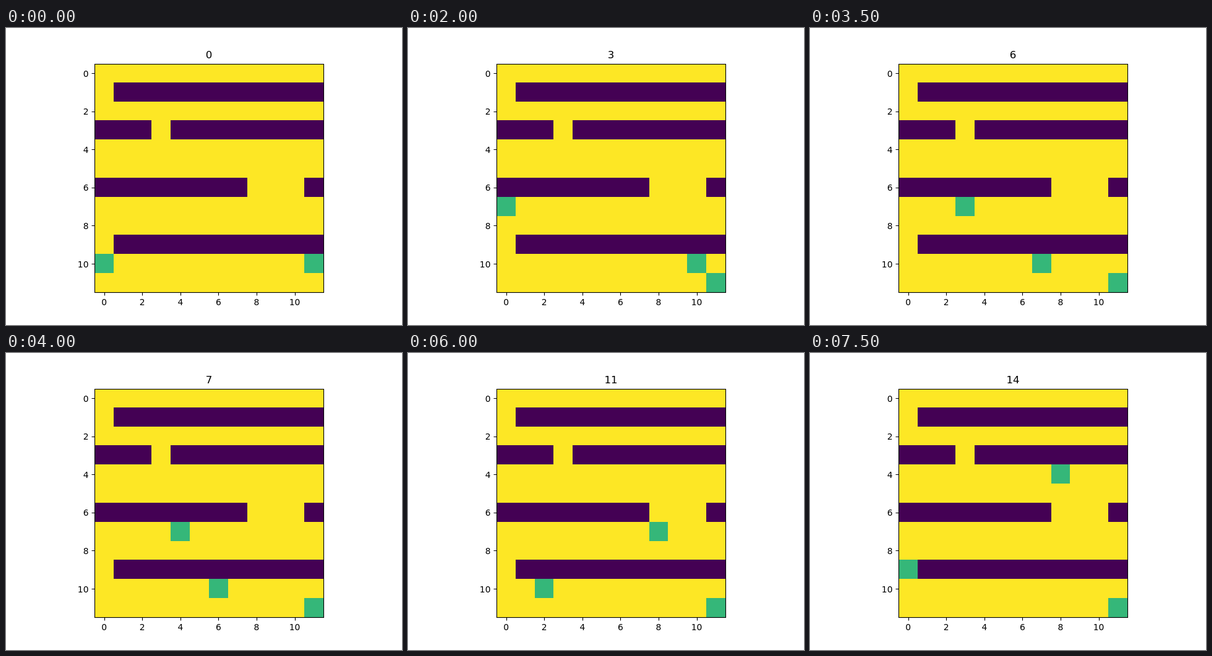
Write an HTML page that moves like this. It is 640 by 480 pixels and loops after 8 s.

```html
<!DOCTYPE html>
<html lang="en">
<head>
<meta charset="utf-8">
<title>Grid walk</title>
<style>
  html, body { margin: 0; width: 100%; height: 100%; overflow: hidden; background: #fff; }
  svg { display: block; }
  text { font: 13.889px "DejaVu Sans", sans-serif; fill: #000; }
  #count { font-size: 16.667px; }
  .axis { fill: none; stroke: #000; stroke-width: 1.11; }
  .wall { fill: #440154; }
  .walker { fill: #35b779; }
</style>
</head>
<body>
<svg id="stage" width="640" height="480" viewBox="0 0 640 480">
  <rect x="143" y="58" width="370" height="369" fill="#fde725"/>
  <g id="cells"></g>
  <g id="axes"></g>
  <text id="count" x="328" y="49" text-anchor="middle">0</text>
</svg>
<script>
const LOOP = 8000, STEP = 500, LAST = 14;
const SIZE = 370, COUNT = 12;
const cells = document.getElementById('cells');
const axes = document.getElementById('axes');
const counter = document.getElementById('count');

function add(parent, tag, attrs) {
  const node = document.createElementNS('http://www.w3.org/2000/svg', tag);
  for (const key in attrs) node.setAttribute(key, attrs[key]);
  parent.appendChild(node);
  return node;
}

// Cell borders snap to whole pixels, halves going down.
const edge = (start, i) => Math.ceil(start + SIZE * i / COUNT - 0.5);

function place(rect, col, row, span = 1) {
  const x = edge(143, col), y = edge(57, row);
  rect.setAttribute('x', x);
  rect.setAttribute('y', y);
  rect.setAttribute('width', edge(143, col + span) - x);
  rect.setAttribute('height', edge(57, row + 1) - y);
}

// Walls: column, row, length
const walls = [[1, 1, 11], [0, 3, 3], [4, 3, 8], [0, 6, 8], [11, 6, 1], [1, 9, 11]];
for (const wall of walls) place(add(cells, 'rect', { class: 'wall' }), ...wall);

// Walkers: waypoints as step, column, row; hidden before the first
const routes = [
  [[0, 0, 10], [3, 0, 7], [11, 8, 7], [14, 8, 4]],
  [[0, 11, 10], [1, 11, 11]],
  [[2, 11, 10], [13, 0, 10], [14, 0, 9]]
];
const walkers = routes.map(() => add(cells, 'rect', { class: 'walker' }));

function locate(route, step) {
  if (step < route[0][0]) return null;
  const next = route.findIndex(point => point[0] > step);
  if (next < 0) return route[route.length - 1].slice(1);
  const [s0, x0, y0] = route[next - 1], [s1, x1, y1] = route[next];
  const part = (step - s0) / (s1 - s0);
  return [Math.round(x0 + (x1 - x0) * part), Math.round(y0 + (y1 - y0) * part)];
}

add(axes, 'rect', { class: 'axis', x: 143.5, y: 58.5, width: 370, height: 369 });
for (let i = 0; i < COUNT; i += 2) {
  const x = 143.2 + 30.8 * (i + 0.5), y = 57.6 + 30.8 * (i + 0.5);
  const tickX = Math.round(x) + 0.5, tickY = Math.round(y) + 0.5;
  add(axes, 'path', { class: 'axis', d: `M${tickX} 427.5v5M143.5 ${tickY}h-5` });
  add(axes, 'text', { x, y: 448, 'text-anchor': 'middle' }).textContent = i;
  add(axes, 'text', { x: 133.5, y: Math.round(y + 5.51), 'text-anchor': 'end' }).textContent = i;
}

let shown = -1;
function draw() {
  const time = performance.now() % LOOP;
  const step = Math.min(LAST, Math.max(0, Math.floor(time / STEP) - 1));
  if (step !== shown) {
    shown = step;
    counter.textContent = step;
    walkers.forEach((rect, i) => {
      const spot = locate(routes[i], step);
      rect.style.display = spot ? '' : 'none';
      if (spot) place(rect, ...spot);
    });
  }
  requestAnimationFrame(draw);
}
draw();
</script>
</body>
</html>
```
